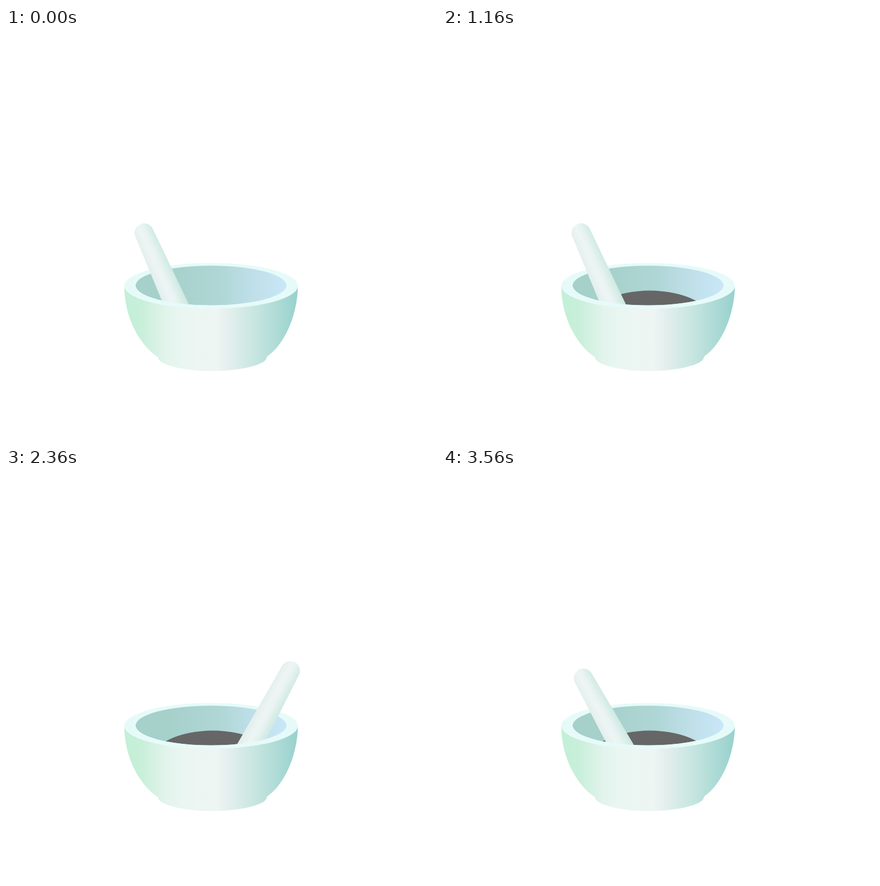
Write an HTML page that moves like this. It is 765 px wide and 732 px high and loops after 3.6 s.

```html
<!DOCTYPE html>
<html lang="en">
<head>
<meta charset="utf-8">
<title>Mortar and pestle</title>
<style>
  html, body { margin: 0; width: 100%; height: 100%; overflow: hidden; background: #fff; }
  svg { display: block; width: 765px; height: 732px; }
</style>
</head>
<body>
<svg viewBox="0 0 765 732">
  <defs>
    <linearGradient id="body" gradientUnits="userSpaceOnUse" x1="210" x2="518" y1="0" y2="0">
      <stop offset="0" stop-color="#c3efd7"/>
      <stop offset=".1" stop-color="#c8efda"/>
      <stop offset=".24" stop-color="#e2f4ec"/>
      <stop offset=".34" stop-color="#eaf6f2"/>
      <stop offset=".53" stop-color="#eef5f3"/>
      <stop offset=".6" stop-color="#e4efed"/>
      <stop offset=".75" stop-color="#c8e6e1"/>
      <stop offset="1" stop-color="#97d1cd"/>
    </linearGradient>
    <linearGradient id="inside">
      <stop offset=".2" stop-color="#a6d0ca"/>
      <stop offset=".55" stop-color="#afd6d5"/>
      <stop offset=".78" stop-color="#bfdfe9"/>
      <stop offset="1" stop-color="#c9e7f8"/>
    </linearGradient>
    <linearGradient id="shaft">
      <stop offset="0" stop-color="#e0eeeb"/>
      <stop offset=".4" stop-color="#eef5f4"/>
      <stop offset=".58" stop-color="#e8f3f1"/>
      <stop offset="1" stop-color="#c9e8df"/>
    </linearGradient>
    <linearGradient id="head" x1="0" y1="0" x2="0" y2="1">
      <stop offset="0" stop-color="#cdefdb"/>
      <stop offset="1" stop-color="#dcf4e8"/>
    </linearGradient>
    <clipPath id="hollow"><ellipse cx="364" cy="457.5" rx="134" ry="35.2"/></clipPath>
  </defs>

  <ellipse cx="364" cy="458" rx="154" ry="40.5" fill="#e6fbf9"/>
  <ellipse cx="364" cy="457.5" rx="134" ry="35.2" fill="url(#inside)"/>

  <g clip-path="url(#hollow)">
    <ellipse id="mound" cx="367" cy="520.6" rx="110" ry="54" fill="#666"/>
    <ellipse id="ridge" cx="372" cy="521" rx="110" ry="54" fill="none" stroke="#585858" stroke-width=".8"/>
  </g>

  <g id="pestle">
    <path d="M-17 -243A17 17 0 0 1 17 -243L22.5 -36H-22.5Z" fill="url(#shaft)"/>
    <path d="M-22.5 -36H22.5L31 -21H-31Z" fill="#d7f3e4"/>
    <path d="M-31 -21H31A31 21 0 0 1 -31 -21Z" fill="url(#head)"/>
  </g>

  <path fill="url(#body)" d="M210 458C210 516 238 564 270 585C269 597 312 609.5 366 609.5
    C420 609.5 465 597 463 584C496 562 518 506 518 458A154 40.5 0 0 1 210 458Z"/>
  <path fill="#e6fbf9" d="M210 458A154 40.5 0 0 0 518 458L498 457.5A134 35.2 0 0 1 230 457.5Z"/>
</svg>
<script>
  const LOOP = 3600, STEP = 40;
  const ABOVE_AT = 360, AWAY_AT = 720, BACK_AT = 1160, END_AT = 3560;
  const SWING = 400;

  // Poses are the pestle's foot and its lean to the left in degrees.
  const rest = { x: 344, y: 586, lean: 24 };
  const above = { x: 282, y: 308, lean: 27 };
  const away = { x: 223.5, y: 255.5, lean: 47 };

  const get = id => document.getElementById(id);
  const pestle = get('pestle'), mound = get('mound'), ridge = get('ridge');
  const mix = (a, b, k) => a + (b - a) * k;
  const blend = (a, b, k) => ({
    x: mix(a.x, b.x, k), y: mix(a.y, b.y, k), lean: mix(a.lean, b.lean, k)
  });

  // Swings left and right at an even pace while the foot drifts and lifts.
  function grind(t) {
    const p = Math.min(1, (t - BACK_AT) / (END_AT - BACK_AT));
    const phase = (p * (END_AT - BACK_AT) / SWING) % 2;
    const k = 1 - Math.abs(1 - phase);
    const arc = Math.sin(Math.PI * p);
    return {
      x: rest.x + 23 * p + 34 * k ** 3,
      y: rest.y - 12 * arc - 11 * Math.sin(Math.PI * k),
      lean: mix(rest.lean + 5 * p + 4.3 * arc, -28.3, k)
    };
  }

  function poseAt(t) {
    if (t < ABOVE_AT) return blend(rest, above, t / ABOVE_AT);
    if (t < AWAY_AT) return blend(above, away, (t - ABOVE_AT) / (AWAY_AT - ABOVE_AT));
    if (t < BACK_AT) return blend(away, rest, (t - AWAY_AT) / (BACK_AT - AWAY_AT));
    return grind(t);
  }

  function draw(t) {
    const { x, y, lean } = poseAt(t);
    pestle.setAttribute('transform', `translate(${x} ${y}) rotate(${-lean})`);

    // The powder rises into view while the pestle is away.
    const sink = Math.min(28, Math.max(0, (675 - t) * 0.056));
    mound.setAttribute('transform', `translate(0 ${sink})`);
    ridge.setAttribute('transform', `translate(0 ${sink * 3.4})`);
    ridge.setAttribute('visibility', sink > 0 ? 'visible' : 'hidden');
  }

  const start = performance.now();
  function tick() {
    const t = (performance.now() - start) % LOOP;
    draw(Math.floor(t / STEP) * STEP);
    requestAnimationFrame(tick);
  }
  draw(0);
  requestAnimationFrame(tick);
</script>
</body>
</html>
```
